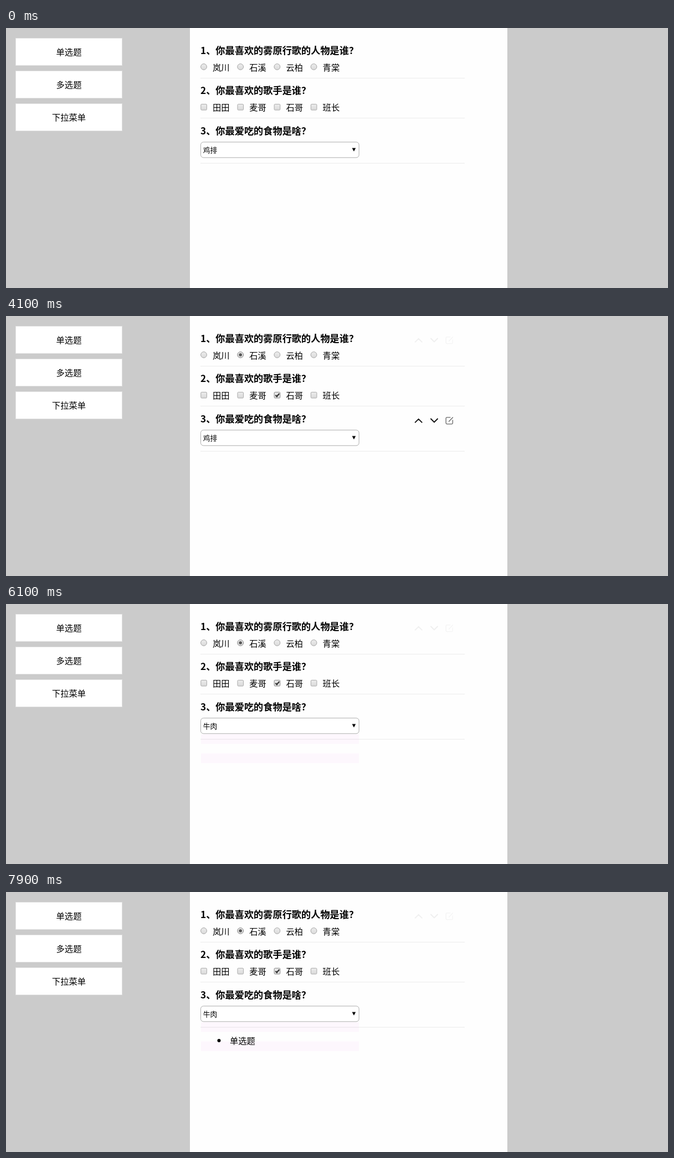
Animation of 1195 by 469 pixels, one loop 8 s. Source, as an HTML page:

```html
<!DOCTYPE html>
<html lang="zh-CN">
<head>
<meta charset="utf-8">
<style>
html, body { margin: 0; width: 100%; height: 100%; overflow: hidden; background: #cbcbcb; }
svg { display: block; font-family: "Noto Sans CJK SC", "Noto Sans CJK", sans-serif; }
</style>
</head>
<body>
<svg id="stage" width="1195" height="469" viewBox="0 0 1195 469"></svg>
<script>
const LOOP = 8000, ROW = 72.5, STEP = 66.2, LINE = 17.3;
const stage = document.getElementById('stage');

// Text placed by its vertical centre
const text = (x, mid, str, size = 15.3, attrs = '') =>
  `<text x="${x}" y="${mid + size * 0.38}" font-size="${size}" ${attrs}>${str}</text>`;
const rect = (x, y, w, h, attrs) =>
  `<rect x="${x}" y="${y}" width="${w}" height="${h}" ${attrs}/>`;
const rows = (list, draw) => list.map(draw).join('');

const button = (x, y, label) =>
  rect(x + .5, y + .5, 192, 49, 'fill="#fff" stroke="#e2e2e2"') +
  text(x + 96.5, y + 25.3, label, 15.3, 'text-anchor="middle"');

const heading = (i, str) =>
  text(351, 40 + i * ROW, `${i + 1}、${str}`, 17.2, 'font-weight="700"');

const radio = (label, i) =>
  `<circle id="radio${i}" cx="${357 + i * STEP}" cy="70" r="5.4" fill="url(#face)" stroke="#a6a6a6"/>` +
  text(373 + i * STEP, 71, label);

const checkbox = (label, i) =>
  rect(351.8 + i * STEP, 137.4, 10.6, 10.6, `id="box${i}" rx="1.5" fill="url(#face)" stroke="#a9a9a9"`) +
  text(373 + i * STEP, 143.5, label);

const toolbar = i =>
  `<g id="tools${i}" transform="translate(0 ${i * ROW})" fill="none" stroke-linecap="round" stroke-linejoin="round">
    <path d="M738.7 46.8l6-6 6 6M767 40.5l6 6 6-6" stroke="#111" stroke-width="1.9"/>
    <path d="M802 37.8h-6q-1.8 0-1.8 1.8v8.4q0 1.8 1.8 1.8h8.6q1.8 0 1.8-1.8v-5M799.5 45.2l7-7.2" stroke="#666" stroke-width="1.3"/>
  </g>`;

const lineTop = i => 235 + i * LINE;
const tint = i => rect(352, lineTop(i), 285, LINE, `id="tint${i}" fill="#fef8fe" style="mix-blend-mode:multiply"`);
const foods = ['鸡排', '牛肉', '豆浆', '鸡蛋'];

stage.innerHTML = `
  <defs><linearGradient id="face" x2="0" y2="1">
    <stop stop-color="#ececec"/><stop offset="1" stop-color="#dadada"/>
  </linearGradient></defs>
  ${rect(0, 0, 1195, 469, 'fill="#cbcbcb"')}
  ${rect(332, 0, 573, 469, 'fill="#fefefe"')}
  ${rows(['单选题', '多选题', '下拉菜单'], (s, i) => button(17, 18 + Math.round(i * 59.2), s))}
  ${rows([90, 162, 243.5], y => rect(351, y, 477, 1, 'fill="#ececec"'))}
  ${rows(['你最喜欢的雾原行歌的人物是谁？', '你最喜欢的歌手是谁？', '你最爱吃的食物是啥？'], (s, i) => heading(i, s))}
  ${rows(['岚川', '石溪', '云柏', '青棠'], radio)}
  <circle id="dot" cx="423.2" cy="70" r="2.8" fill="#555"/>
  ${rows(['田田', '麦哥', '石哥', '班长'], checkbox)}
  <path id="tick" d="M486.5 142.8l2.4 2.5 4.3-5.4" fill="none" stroke="#333" stroke-width="2.3"/>
  ${rows([0, 1, 2], toolbar)}
  ${rect(351.5, 205.8, 285.7, 28, 'id="field" rx="5" fill="#fff"')}
  <path d="M624.7 216.5h6.6l-3.3 6.2z"/>
  ${text(355.8, 220.3, '', 12.7, 'id="value"')}
  ${rect(351.5, 234.5, 285.7, 70, 'id="list" fill="#fff" stroke="#7b9fd6"')}
  ${tint(0)}${tint(2)}
  <g id="options">
    ${rect(352, 0, 285, LINE, 'id="mark" fill="#1e90ff"')}
    ${rows(foods, (s, i) => text(355.8, 243.6 + i * LINE, s, 12.7, 'class="food"'))}
  </g>
  <g id="item"><circle cx="384.5" cy="268" r="3"/>${text(404, 268, '单选题')}</g>
  <g id="drag">${button(0, 0, '单选题')}</g>`;

const get = id => document.getElementById(id);
const show = (id, on) => get(id).style.display = on ? '' : 'none';
const set = (id, name, value) => get(id).setAttribute(name, value);
const foodText = document.querySelectorAll('.food');

function draw(t) {
  const during = (from, to = LOOP) => t >= from && t < to;

  // Toolbars follow the pointer; the first one leaves a faint trace
  show('tools0', during(800));
  set('tools0', 'opacity', during(2800) ? 0.06 : 1);
  show('tools1', during(400, 800) || during(2800, 4100));
  show('tools2', during(4100, 6100));

  set('radio1', 'stroke', during(800) ? '#858585' : '#a6a6a6');
  show('dot', during(2600));
  set('box2', 'stroke', during(3200) ? '#858585' : '#a9a9a9');
  set('box2', 'fill', during(3700, 3800) ? '#d2d2d2' : 'url(#face)');
  show('tick', during(3800));

  const open = during(4900, 6100);
  const picked = t < 5200 ? 0 : during(5300, 5500) ? 2 : 1;
  set('field', 'stroke', open ? '#7ea6e4' : '#adadad');
  set('field', 'stroke-width', open ? 2 : 1);
  get('value').textContent = foods[during(6100) ? 1 : 0];
  show('list', open);
  show('options', open);
  set('mark', 'y', lineTop(picked));
  foodText.forEach((el, i) => el.setAttribute('fill', i === picked ? '#fff' : '#000'));
  show('tint0', during(5200));
  show('tint2', during(5500));

  const k = Math.floor((t - 7400) / 100) / 4;
  show('drag', during(7400, 7900));
  set('drag', 'transform', `translate(${91 + 355 * k} ${80 + 186 * k})`);
  show('item', during(7900));
}

function tick(now) {
  draw(now % LOOP);
  requestAnimationFrame(tick);
}
tick(performance.now());
</script>
</body>
</html>
```
